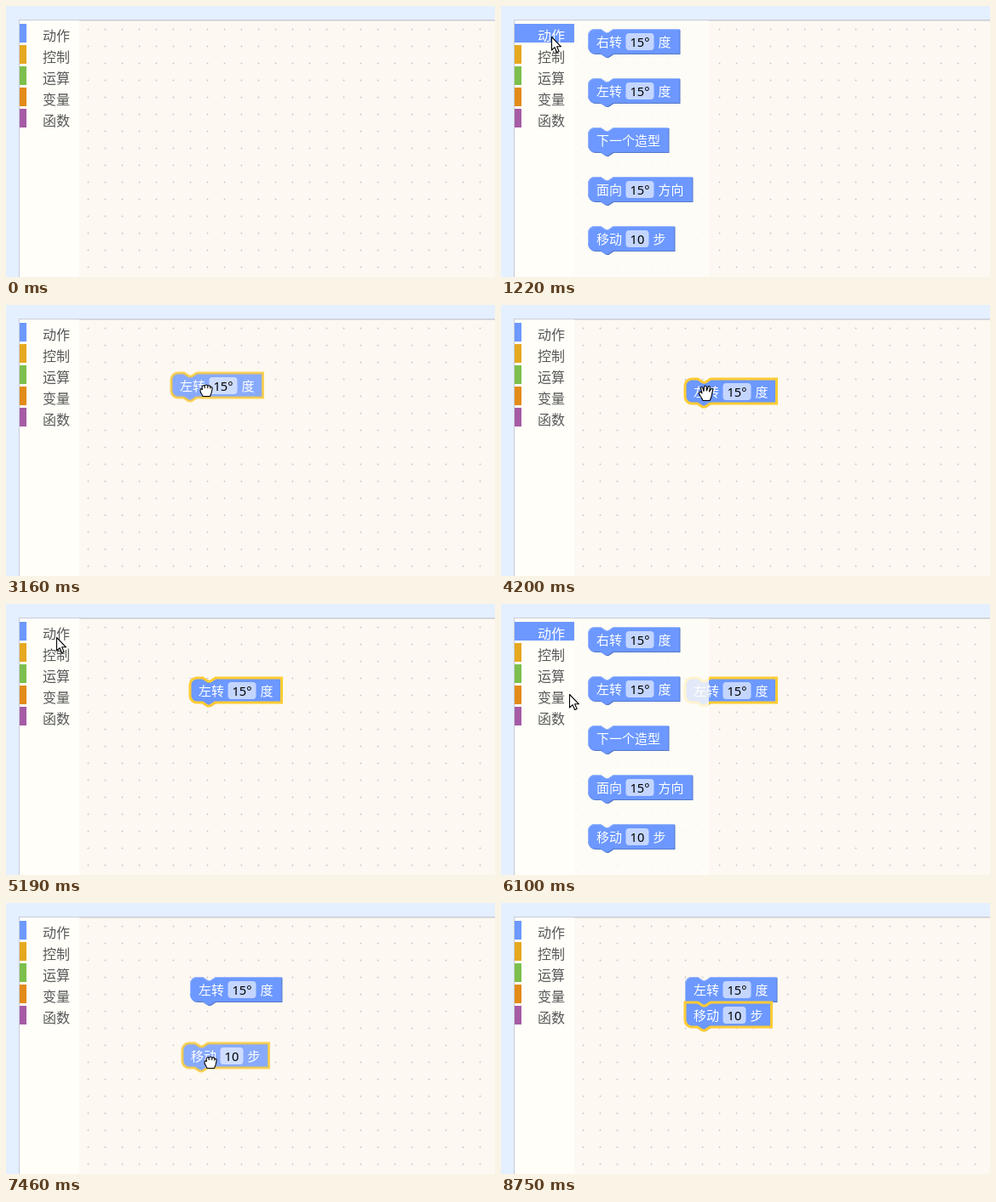
Recreate the animation shown at these times as an HTML page. Size 574x319 px, loop 9.55 s.

```html
<!DOCTYPE html>
<html lang="zh-CN">
<head>
<meta charset="utf-8">
<title>积木拖放</title>
<style>
  html, body { margin: 0; width: 100%; height: 100%; overflow: hidden; background: #e4f0ff; }
  svg { display: block; }
  text { font-family: "Noto Sans CJK SC", "Noto Sans CJK", sans-serif; white-space: pre; }
  .label { font-size: 16px; fill: #575757; }
  .word { font-size: 15px; fill: #fff; }
  .value { font-family: "Noto Sans", "Open Sans", sans-serif; font-size: 14.67px; fill: #000; text-anchor: middle; }
</style>
</head>
<body>
<svg id="stage" width="574" height="319" viewBox="0 0 574 319"></svg>
<script>
const LOOP = 9550;
const BLUE = '#6c98ff', PANEL = '#fffef8', GLOW = '#ffcc33';
const EM = 15, BLOCK_H = 29;
const stage = document.getElementById('stage');

function el(parent, tag, attrs = {}, text) {
  const node = document.createElementNS('http://www.w3.org/2000/svg', tag);
  for (const key in attrs) node.setAttribute(key, attrs[key]);
  if (text) node.textContent = text;
  parent.appendChild(node);
  return node;
}
const rect = (parent, x, y, width, height, fill, more) =>
  el(parent, 'rect', { x, y, width, height, fill, ...more });
const show = (node, on) => node.setAttribute('display', on ? 'inline' : 'none');

// Workspace and its grid of small crosses
rect(stage, 15, 16, 559, 303, '#c9cbdc');
rect(stage, 16, 17, 558, 302, '#fdf8f1');
rect(stage, 16, 17, 558, 0.5, '#c6c6c6');
let grid = '';
for (let x = 96; x < 574; x += 20)
  for (let y = 27; y < 319; y += 20) grid += `M${x - 0.5} ${y + 0.5}h2M${x + 0.5} ${y - 0.5}v2`;
el(stage, 'path', { d: grid, stroke: '#ccc' });

// Category list
rect(stage, 16, 17, 70, 302, PANEL);
const rows = [['动作', BLUE], ['控制', '#e6a81f'], ['运算', '#7cbf4c'], ['变量', '#e28b18'], ['函数', '#a55ba5']]
  .map(([name, color], i) => ({
    bar: rect(stage, 16, 21 + 25 * i, 8, 22, color),
    label: el(stage, 'text', { class: 'label', x: 43, y: 41 + 25 * i }, name)
  }));

function blockPath(w, squareTop, squareBottom) {
  const top = squareTop ? 'M0 0' : 'M0 8A8 8 0 0 1 8 0';
  const bottom = squareBottom ? 'H0' : 'H8a8 8 0 0 1 -8 -8';
  return `${top}H15l6 4h3l6 -4H${w}v${BLOCK_H}H29.5l-6 4h-3l-6 -4${bottom}Z`;
}

function makeBlock(parent, before, value, after = '') {
  const node = el(parent, 'g');
  const shadow = el(node, 'path', { fill: '#567acc', transform: 'translate(1,1)' });
  const body = el(node, 'path', { fill: BLUE });
  const shine = el(node, 'path', { fill: 'none', stroke: '#98b7ff' });
  el(node, 'text', { class: 'word', x: 10, y: 21 }, before);
  let end = 10 + before.length * EM;
  if (value) {
    const w = value.length > 2 ? 33 : 27;
    rect(node, end + 4.5, 5, w, 20, '#fff', { rx: 4, 'fill-opacity': 0.6 });
    el(node, 'text', { class: 'value', x: end + 4.5 + w / 2, y: 21 }, value);
    end += w + 10;
    el(node, 'text', { class: 'word', x: end - 0.5, y: 21 }, after);
    end += after.length * EM;
  }
  const block = { node, shadow, body, shine, w: end + 9.5 };
  shape(block, false, false);
  return block;
}

function shape(block, squareTop, squareBottom) {
  const d = blockPath(block.w, squareTop, squareBottom);
  block.shadow.setAttribute('d', d);
  block.body.setAttribute('d', d);
  const left = squareBottom ? BLOCK_H - 0.5 : BLOCK_H - 8;
  const corner = squareTop ? 'V.5' : 'V8A7.5 7.5 0 0 1 8 .5';
  block.shine.setAttribute('d', `M.5 ${left}${corner}H15l6 4h3l6 -4H${block.w - 0.5}`);
}

function place(block, x, y) {
  block.x = x;
  block.y = y;
  block.node.setAttribute('transform', `translate(${x},${y})`);
}

function style(block, glowing, dragged = false) {
  const alpha = dragged ? 0.8 : 1;
  block.body.setAttribute('stroke', glowing ? GLOW : 'none');
  block.body.setAttribute('stroke-width', 3);
  block.body.setAttribute('fill-opacity', alpha);
  block.body.setAttribute('stroke-opacity', alpha);
  show(block.shine, !glowing);
  show(block.shadow, !dragged);
}

const contains = (b, x, y) => x >= b.x && x <= b.x + b.w && y >= b.y && y <= b.y + BLOCK_H;

const turn = makeBlock(stage, '左转', '15°', '度');
const move = makeBlock(stage, '移动', '10', '步');
const ripple = el(stage, 'circle', { cx: 239, cy: 120, fill: 'none', stroke: '#888', 'stroke-width': 10 });

const flyout = el(stage, 'g');
rect(flyout, 86, 17, 158, 302, PANEL, { 'fill-opacity': 0.8 });
const shelf = [['右转', '15°', '度'], ['左转', '15°', '度'], ['下一个造型'], ['面向', '15°', '方向'], ['移动', '10', '步']]
  .map((parts, i) => {
    const block = makeBlock(flyout, ...parts);
    place(block, 102, 27 + 58 * i);
    return block;
  });

// Cursors: the arrow hangs from its tip, the hands sit on their centre
const pointer = el(stage, 'g');
const ink = { fill: '#fff', stroke: '#000', 'stroke-width': 1.1, 'stroke-linejoin': 'round' };
const cursors = {
  arrow: 'M.5 .5V16l3.6 -3.3 2.5 5.8 2.5 -1.1 -2.5 -5.6H11.5Z',
  open: 'M-3 8.5C-4 5 -7 2.5 -7.5 .5C-8 -2 -5.5 -2.5 -4 0L-5.5 -6C-5.5 -8 -3.5 -8 -3 -6L-2 -2.5 -1.5 -7.5' +
    'C-1.5 -9.5 1 -9.5 1 -7.5L1.5 -3 3 -7.5C3.5 -9 5.7 -8.5 5.3 -6.5L4.5 -2 6.5 -5C7.5 -6.5 9.3 -5.5 8.5 -3.5C7.5 0 7.5 5 5 8.5Z',
  closed: 'M-3 8.5C-4 5.5 -6 4.5 -6 1.5C-6 -.5 -4 -.5 -3.5 .5L-4 -2.5C-3.5 -5 -1 -4.5 -.8 -3.5C0 -5.5 2.5 -5.3 2.8 -3.5' +
    'C4 -5 5.8 -4 5.8 -2.5C7.5 -3.5 8.5 -1.5 8 .5C7.5 3.5 7 5.5 5.5 8.5ZM-.8 -3.5v2.5M2.8 -3.5v2.5M5.8 -2.5v2'
};
for (const name in cursors) cursors[name] = el(pointer, 'path', { d: cursors[name], ...ink });

const linear = u => u;
const easeOut = u => 1 - (1 - u) ** 2;
const easeIn = u => u ** 1.6;
const smooth = u => u * u * (3 - 2 * u);

// Pointer stops: time, x, y, easing on the way there
const route = [
  [210, 400, 318], [850, 59, 36, easeOut],
  [1640, 59, 36], [1910, 140, 44, smooth],
  [2370, 140, 44], [2580, 142, 104, smooth],
  [2860, 142, 104], [3160, 234, 99, linear], [3370, 264, 99, easeOut],
  [3850, 264, 99], [3850, 258, 109],
  [4020, 258, 109], [4960, 69, 58, smooth],
  [5030, 69, 58], [5190, 59, 39, smooth],
  [5330, 59, 39], [5370, 57, 37, linear],
  [5760, 57, 37], [6700, 134, 266, smooth],
  [6730, 134, 266], [6940, 134, 280, smooth],
  [7100, 134, 280], [7460, 239, 186, linear], [7760, 252, 144, easeOut],
  [8440, 252, 144], [8750, 415, 319, easeIn]
];

function pointerAt(t) {
  let i = route.findIndex(stop => stop[0] > t);
  if (i < 0) i = route.length - 1;
  if (i === 0) i = 1;
  const [t0, x0, y0] = route[i - 1];
  const [t1, x1, y1, ease = linear] = route[i];
  const u = ease(Math.min(1, Math.max(0, (t - t0) / (t1 - t0))));
  return [Math.round(x0 + (x1 - x0) * u), Math.round(y0 + (y1 - y0) * u)];
}

const within = (t, a, b) => t >= a && t < b;

function render(t) {
  const [px, py] = pointerAt(t);
  const isOpen = within(t, 1220, 2860) || within(t, 5570, 7100);
  const dragTurn = within(t, 2860, 3700), dragMove = within(t, 7100, 8090);
  const joined = t >= 8090;

  rows[0].bar.setAttribute('width', isOpen ? 70 : 8);
  rows[0].label.style.fill = isOpen ? '#fff' : '';
  show(flyout, isOpen);
  let overBlock = false;
  for (const block of shelf) {
    const hit = isOpen && contains(block, px, py);
    style(block, hit);
    overBlock = overBlock || hit;
  }

  show(turn.node, t >= 2860);
  if (t < 3850) place(turn, px - 40, py - 19);
  else place(turn, 216, 87);
  style(turn, t < 7100, dragTurn);
  shape(turn, false, joined);

  show(move.node, t >= 7100);
  if (joined) place(move, 216, 117);
  else place(move, px - 32, py - 21);
  style(move, true, dragMove);
  shape(move, joined, false);

  const wave = (t - 8090) / 150;
  show(ripple, wave >= 0 && wave < 1);
  ripple.setAttribute('r', Math.max(0, wave * 25));
  ripple.setAttribute('opacity', Math.min(1, Math.max(0, 1 - wave)));

  if (!isOpen) {
    overBlock = (t >= 2860 && contains(turn, px, py)) || (t >= 7100 && contains(move, px, py));
  }
  const kind = dragTurn || dragMove ? 'closed' : overBlock ? 'open' : 'arrow';
  for (const name in cursors) show(cursors[name], name === kind);
  show(pointer, within(t, 210, 8750));
  pointer.setAttribute('transform', `translate(${px},${py})`);
}

const start = performance.now();
function tick() {
  render((performance.now() - start) % LOOP);
  requestAnimationFrame(tick);
}
tick();
</script>
</body>
</html>
```
